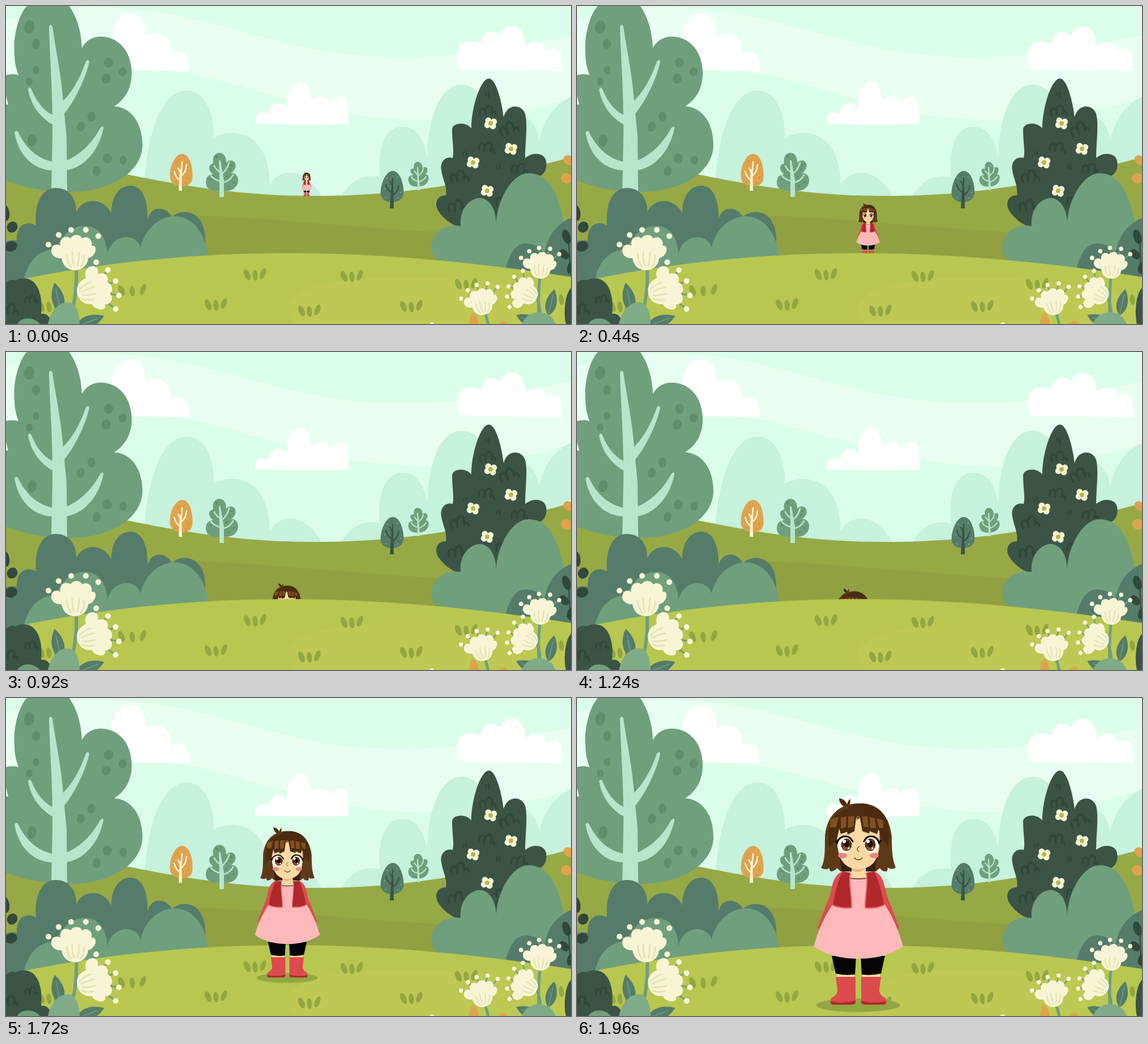
Animation of 998x561 px, one loop 2400 ms. Source, as an HTML page:

```html
<!DOCTYPE html>
<html lang="en">
<head>
<meta charset="utf-8">
<title>Meadow walk</title>
<style>
html,body{margin:0;width:100%;height:100%;overflow:hidden}
svg{display:block;width:100vw;height:100vh}
</style>
</head>
<body>
<script>
const C = {
  mist: '#c6f1dc', leaf: '#709f7e', spot: '#608e6b', pale: '#b6e5cb', teal: '#557c6a',
  dark: '#3b5446', deep: '#31483c', hill: '#96a945', shade: '#91a041', lawn: '#b7c74f',
  glow: '#bdc953', blade: '#92a642', cream: '#f8f5d6', amber: '#dfa34e', bulb: '#7fac86',
  hair: '#4b2c11', lock: '#5d3918', shine: '#84501f', skin: '#fbd9a2', red: '#dd4b4e',
  wine: '#b0282b', pink: '#fdb9ba'
};
const shape = (fill, d) => `<path fill="${fill}" d="${d}"/>`;
const line = (color, w, d) =>
  `<path fill="none" stroke="${color}" stroke-width="${w}" stroke-linecap="round" stroke-linejoin="round" d="${d}"/>`;
const oval = (fill, x, y, rx, ry = rx, rot = 0) =>
  `<ellipse fill="${fill}" rx="${rx}" ry="${ry}" transform="translate(${x} ${y}) rotate(${rot})"/>`;
const ovals = (fill, list) => list.map(o => oval(fill, ...o)).join('');
const place = (x, y, rot, k, body) =>
  `<g transform="translate(${x} ${y}) rotate(${rot}) scale(${k})">${body}</g>`;
const mirror = body => body + `<g transform="translate(994) scale(-1 1)">${body}</g>`;

const tuft = ([x, y, gap = 14]) => ovals(C.blade, [
  [x - gap, y, 5, 10, -24], [x, y + 1, 4.5, 9.5, -6], [x + gap, y - 2, 4.5, 10, 22]]);

const stamens = [[-47, -45], [-29, -62], [-7, -71], [19, -71], [41, -60]];
const bloom = (x, y, rot, k) => place(x, y, rot, k,
  stamens.map(([a, b]) => line(C.leaf, 3, `M0-25L${a} ${b}`)).join('') +
  shape(C.cream, 'M0 0C-15 0-22-10-24-21C-36-20-43-28-42-35C-41-45-33-47-26-43C-28-58-16-62-8-56C-4-64 10-64 12-56C22-62 32-54 29-43C38-45 38-33 33-28C30-23 26-22 23-21C22-8 12 0 0 0Z') +
  line('#e6e4b5', 3, 'M-15-28Q-14-14-7-6M-5-32Q-5-16-2-8M7-31Q7-16 4-8M16-26Q16-14 10-6') +
  ovals(C.cream, stamens.map(([a, b]) => [a, b, 5])));

const daisy = ([x, y]) => place(x, y, 12, 1,
  ovals(C.cream, [[-5, -4, 5.5], [5, -4, 5.5], [-5, 4, 5.5], [5, 4, 5.5]]) + oval('#b6b948', 0, 0, 4));
const curl = ([x, y, rot, k = 1]) => place(x, y, rot, k,
  line(C.deep, 3.5, 'M-12 4Q-15-7-8-8Q-2-8-3 4Q-3-13 5-12Q11-10 8 2Q14-5 15 5'));
const leafBlade = (x, y, rot, k) => place(x, y, rot, k,
  shape(C.teal, 'M0 0C-16-14-13-36 0-54C13-36 16-14 0 0Z') + line(C.leaf, 1.6, 'M0-2V-42'));

const sky = () =>
  `<path fill="#dafee9" d="M0 0H998V561H0Z"/>` +
  shape('#e9fef2', 'M0 26C60 5 130 0 190 3C390 14 480 90 700 90C820 90 910 70 998 52V162C900 194 800 203 730 201C540 198 420 130 290 114C190 105 90 110 0 130Z') +
  shape('#fff', 'M180 113C184 95 188 85 186 60C186 30 200 13 219 13C238 13 248 30 247 54C264 42 293 47 292 84C312 72 326 88 323 115Z') +
  shape('#fff', 'M441 207C438 190 450 183 463 190C465 170 487 164 496 180C494 155 505 133 521 133C532 133 537 148 540 168C550 156 568 156 573 172C580 155 604 155 604 175L605 208Q520 211 441 207Z') +
  shape('#fff', 'M803 112C790 95 793 48 838 66C842 42 862 42 873 52C880 28 918 28 918 72C930 56 953 62 954 80C965 70 981 74 981 92L982 115Z');

const distance = () =>
  shape(C.mist, 'M243 340C246 220 277 149 319 149C352 149 368 190 367 232C400 215 465 218 466 317C480 285 530 280 560 340Z') +
  shape(C.mist, 'M590 340C608 305 635 296 661 302C655 255 668 213 700 213C728 213 740 240 744 267C745 190 770 139 804 139C840 139 855 180 862 235C868 170 934 180 942 236C950 198 972 172 998 160V340Z') +
  shape(C.hill, 'M0 255C200 290 340 334 534 335S850 305 998 267V561H0Z') +
  shape(C.shade, 'M300 369C450 370 650 396 800 400V470H300Z');

const saplings = () =>
  shape(C.amber, 'M311 261C327 261 331 292 329 306C326 323 294 322 290 305C287 288 297 261 311 261Z') +
  ovals('#c98f42', [[303, 274, 1.6], [320, 284, 1.6], [296, 294, 1.6], [322, 303, 1.6], [300, 311, 1.6], [318, 312, 1.6]]) +
  line('#fbf3d2', 2.6, 'M308 308Q300 303 297 292M309 300Q318 294 319 280M308 294L304 286M311 275L309 300') +
  shape('#fbf3d2', 'M307 288H310L311 326H305Z') +
  shape(C.leaf, 'M377 259C386 259 389 268 389 276C399 267 410 277 404 288C400 294 397 295 394 296C405 291 413 302 409 314C402 328 389 327 380 325C365 329 352 323 353 310C354 300 360 296 367 297C357 292 356 279 366 278C364 268 368 259 377 259Z') +
  ovals(C.spot, [[372, 266, 2, 3], [370, 285, 2], [398, 281, 2], [396, 288, 2], [362, 306, 2], [390, 301, 2], [402, 311, 2], [393, 318, 2]]) +
  line(C.pale, 2.6, 'M380 309Q367 307 361 298M381 312Q396 309 401 298M379 294Q371 289 368 282M382 296Q392 286 394 276') +
  shape(C.pale, 'M376 273Q378 270 379 274L385 308V337H377V300Z') +
  shape(C.teal, 'M683 291C698 291 704 321 702 332C699 350 667 351 662 334C660 318 670 291 683 291Z') +
  ovals('#78a58a', [[673, 304, 1.3], [691, 302, 1.3], [669, 322, 1.3], [694, 319, 1.3], [671, 338, 1.3], [692, 339, 1.3], [697, 329, 1.3]]) +
  line(C.dark, 2.4, 'M682 329Q673 325 671 315M682 335Q692 328 694 317M683 318L678 309M683 304V325') +
  shape(C.dark, 'M681 315H684L685 357H678Z') +
  shape(C.leaf, 'M727 275C734 275 736 282 736 286C744 280 748 290 741 297C750 296 748 313 737 317C726 320 713 320 711 309C709 301 715 297 720 299C711 292 714 285 721 287C719 280 722 275 727 275Z') +
  line(C.pale, 2, 'M728 309Q719 308 716 301M729 311Q739 307 742 301M728 299L721 291M729 299Q736 294 737 287') +
  shape(C.pale, 'M726 284H728L731 325H727Z');

const oak = () =>
  shape(C.leaf, 'M45-8C20 10 12 60 15 85C15 100 18 110 22 122C10 118 0 122-6 124V155L0 158L4 174L-6 173V306C20 316 60 328 110 328C190 328 241 290 241 245C241 205 220 178 191 177C210 165 223 145 222 115C220 75 195 54 168 54C152 54 141 61 134 74C133 40 122 10 105-8Z') +
  ovals(C.spot, [[41, 37, 9, 12, 10], [53, 67, 7, 9, 10], [53, 113, 6, 7], [41, 133, 6, 7], [46, 237, 8, 11, 10],
    [181, 100, 8, 9], [177, 128, 8, 9, 20], [206, 116, 7, 8, 20], [151, 195, 7, 9], [132, 213, 7, 9, 20],
    [179, 269, 8, 9], [207, 272, 6.5, 8], [160, 291, 7, 9, 10]]) +
  shape(C.pale, 'M76 36Q79 30 82 36C88 80 98 120 102 180L107 230L108 327H80L82 230C83 150 77 90 76 36Z') +
  shape(C.pale, 'M141 98Q146 92 147 99C140 130 120 170 102 191L97 171C115 155 130 130 141 98Z') +
  shape(C.pale, 'M39 147Q42 141 45 147C55 172 70 187 84 193V210C60 197 44 175 39 147Z') +
  shape(C.pale, 'M166 216Q172 209 172 216C165 252 140 286 104 290V274C130 263 150 245 166 216Z') +
  shape(C.pale, 'M15 223Q19 217 22 224C35 250 55 270 84 275V290C50 290 22 265 15 223Z');

const cypress = () =>
  shape(C.dark, 'M853 128C838 128 822 180 822 216C812 203 788 206 788 218C788 240 792 255 789 268C774 264 766 278 769 290C771 305 780 320 777 334C760 334 756 350 764 362C772 374 785 385 800 390H900L940 300C955 300 961 270 946 263C935 258 925 262 917 268C917 240 922 210 917 190C910 172 885 172 879 196C876 170 866 128 853 128Z') +
  [[850, 188, -5], [888, 220, -20, 1.15], [848, 252, 10], [800, 304, -10, 1.1], [906, 290, 5], [796, 356, -5, 1.1], [879, 346, 0]].map(curl).join('') +
  line(C.deep, 3, 'M848 153V157M853 152V161M808 259V263M813 256V262M867 281V286M872 279V287') +
  [[856, 207], [892, 252], [825, 276], [850, 326]].map(daisy).join('') +
  ovals(C.amber, [[994, 272, 10, 8, 35], [990, 304, 10, 9, 20]]);

const bushes = () =>
  shape(C.leaf, 'M760 447C740 430 755 380 803 388C800 350 830 332 846 341C860 348 865 365 866 383C868 340 895 294 924 295C965 295 985 350 990 420L998 480H760Z') +
  shape(C.teal, 'M878 480C888 435 900 419 918 419C935 419 944 426 951 438C955 405 975 383 998 374V490Z') +
  shape(C.teal, 'M0 490V415Q10 412 19 414C18 384 38 378 53 387C50 350 62 321 88 321C112 321 125 340 124 364C134 338 172 336 186 366C186 335 200 317 220 317C242 317 251 345 250 376C256 352 282 352 293 372C312 355 350 360 352 410V480Z') +
  shape(C.leaf, 'M30 490C38 450 55 432 88 428C100 400 120 388 140 388C165 388 178 410 179 438C188 400 230 400 238 426C245 390 275 371 297 371C335 371 355 410 358 445V490Z');

const lawn = () =>
  shape(C.lawn, 'M0 488C150 455 320 436 495 436C680 436 850 455 998 478V561H0Z') +
  shape(C.glow, 'M510 561C470 520 520 482 680 479C800 476 900 490 998 520V561Z') +
  [[440, 474], [611, 477], [371, 527], [536, 538], [716, 530], [223, 502, 19], [76, 530], [813, 491], [981, 517]].map(tuft).join('');

const foreground = () =>
  ovals(C.deep, [[-1, 365, 7, 14, -8], [11, 390, 9, 10, 35], [9, 424, 11, 9, -15]]) +
  shape(C.dark, 'M0 488Q8 481 16 484C50 470 66 500 62 543Q75 540 82 561H0Z') +
  [[6, 538, 0, 1], [44, 520, 0, .8]].map(curl).join('') +
  shape(C.leaf, 'M20 561C27 548 50 548 60 561Z') +
  line(C.leaf, 6, 'M124 460Q126 500 118 532') +
  leafBlade(97, 541, -12, 1) + leafBlade(123, 566, 69, 1) +
  shape(C.bulb, 'M74 561C80 535 95 521 112 523C125 525 130 545 130 561Z') +
  bloom(126, 508, 77, 1) + bloom(122, 466, 0, 1) +
  ovals(C.deep, [[990, 407, 7, 13, -18], [986, 438, 7, 10, -40], [996, 462, 5, 10, 10]]) +
  line(C.deep, 2, 'M998 475Q994 435 994 405') +
  shape(C.dark, 'M998 497C986 510 985 545 989 561H998Z') +
  line(C.leaf, 5, 'M943 478Q940 510 941 545M938 515Q944 530 944 550') +
  line(C.leaf, 5, 'M845 540Q850 550 852 564') +
  leafBlade(958, 546, 13, .88) + leafBlade(948, 566, -66, .95) +
  shape(C.bulb, 'M911 561C919 542 937 537 952 542Q965 546 971 561Z') +
  shape(C.amber, 'M818 561Q819 544 825 541Q833 546 835 561ZM870 561Q878 550 887 561Z') +
  bloom(943, 481, 4, .76) + bloom(937, 517, -60, .76) + bloom(844, 545, -8, .76) +
  oval(C.cream, 752, 562, 4);

const eye = (x, dx) =>
  oval('#fff', x, 259, 13, 14) + oval('#5b3013', x + dx, 259, 9.5, 11) +
  oval('#8d532a', x + dx, 264, 6.5, 5) + oval('#1c0d05', x + dx, 258, 4.5, 5.5) +
  ovals('#fff', [[x + dx - 4, 253, 3], [x + dx + 4, 265, 1.6]]);

const girl = () =>
  shape(C.hair, 'M463 177C472 178 478 184 479 195C468 192 463 184 463 177ZM483 178C477 182 476 189 479 195C482 190 483 184 483 178Z') +
  shape(C.lock, 'M497 186C460 186 438 212 438 250C438 275 437 290 431 300Q440 304 446 300Q446 305 449 306Q456 305 459 300L466 306H528L535 300Q538 306 547 306Q549 303 549 299Q556 304 563 299C557 285 556 270 556 245C552 205 530 186 497 186Z') +
  shape('#38200c', 'M462 270H532L526 306H468Z') +
  mirror(
    shape(C.red, 'M470 306C456 310 451 325 448 345L425 405Q427 411 432 408L462 366Z') +
    shape('#050505', 'M450 455H493L491 488Q472 490 457 486Z') +
    shape(C.skin, 'M459 487Q472 490 490 488V494H459Z') +
    shape(C.red, 'M457 492H492V538H448Q446 530 453 527Q460 523 460 515Z') +
    shape(C.wine, 'M448 535Q470 540 492 534V538Q490 541 484 541H454Q447 541 448 535Z')) +
  shape(C.pink, 'M482 317H513L520 350L545 366Q565 398 576 438Q545 460 497 460Q450 460 418 438Q428 400 450 366L475 350Z') +
  shape(C.skin, 'M485 298H510V316Q497 320 485 316Z') + shape('#e8b67c', 'M485 300H510Q498 311 485 304Z') +
  line('#7d4a3a', 2, 'M483 318Q497 320 512 318') +
  mirror(
    shape(C.wine, 'M469 306L483 308C479 328 486 348 485 371Q466 373 452 366Q457 330 469 306Z') +
    line('#ec6b6d', 2, 'M483 309C479 328 486 348 485 370Q466 372 453 366')) +
  shape(C.skin, 'M460 235C457 275 466 301 497 302C529 301 537 275 534 235L520 208H474Z') +
  eye(473, 3) + eye(520, -2) +
  line('#160b05', 3, 'M459 257Q462 244 475 244Q483 245 487 253M507 253Q511 244 519 244Q531 244 534 257M460 255L456 252M533 255L537 252') +
  ovals('#e8838a', [[469, 278, 8, 4.5], [525, 278, 8, 4.5]]) +
  line('#a8682f', 1.5, 'M499 262Q491 266 498 271') + line('#6e3517', 1.6, 'M490 282Q497 289 504 282') +
  shape(C.hair, 'M479 195C452 203 440 222 445 262L457 252Q461 244 463 230L466 240L477 236L478 241L490 235L493 212Q497 207 500 212L504 235L516 239L517 235L530 240L533 230Q537 250 549 262C557 225 546 190 505 186Q486 186 479 195Z') +
  shape(C.shine, 'M448 214L462 209L458 228H447ZM466 211L476 209L475 228L466 230ZM479 209L490 208L488 227L479 229ZM494 208L499 208L499 214L494 216ZM504 209L513 209L515 228L506 227ZM517 210L526 212L528 230L518 229ZM530 212L541 216L541 230L533 228Z') +
  shape(C.skin, 'M494 236L495 215Q497 210 499 215L501 236Z');

document.body.innerHTML = `<svg viewBox="0 0 998 561" preserveAspectRatio="none">
<clipPath id="ridge"><path d="M0 0H998V478C850 455 680 436 495 436C320 436 150 455 0 488Z"/></clipPath>
${sky()}${distance()}${saplings()}${oak()}${cypress()}${bushes()}${lawn()}
<g id="layer"><g id="walker"><g id="shadow">${oval(C.blade, 496.5, 542, 74, 12)}</g>${girl()}</g></g>
${foreground()}</svg>`;

// time, centre x, top y, scale
const keys = [
  [0, 531, 293, .116], [1160, 486.5, 438, .503], [1200, 486.5, 438, .51],
  [1520, 497, 270.5, .5], [1960, 497, 176, 1], [2400, 497, 176, 1]
];
const [layer, walker, shadow] = ['layer', 'walker', 'shadow'].map(id => document.getElementById(id));

function draw(now) {
  const t = Math.floor(now % 2400 / 40) * 40;
  const i = keys.findIndex((k, n) => n && t < k[0]);
  const a = keys[i - 1], b = keys[i];
  const u = (t - a[0]) / (b[0] - a[0]);
  const [, x, y, k] = a.map((v, n) => v + (b[n] - v) * u);
  walker.setAttribute('transform', `translate(${x} ${y}) scale(${k}) translate(-497 -176)`);
  const inFront = t >= 1520;
  layer.setAttribute('clip-path', inFront ? 'none' : 'url(#ridge)');
  shadow.setAttribute('visibility', inFront ? 'visible' : 'hidden');
}
const start = performance.now();
const loop = () => { draw(performance.now() - start); requestAnimationFrame(loop); };
loop();
</script>
</body>
</html>
```
